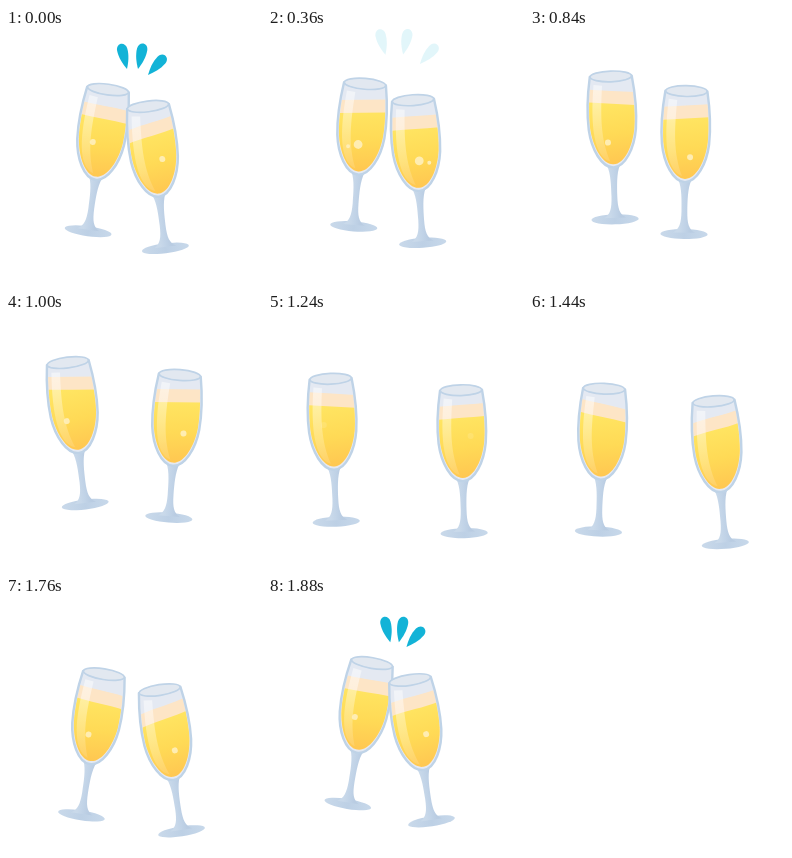
Animation, 256 px wide and 256 px high, one loop 1.92 s. Source, as an HTML page with a canvas:

```html
<!DOCTYPE html>
<html lang="en">
<head>
<meta charset="utf-8">
<title>Cheers</title>
<style>
html, body { margin: 0; width: 100%; height: 100%; overflow: hidden; background: #fff; }
canvas { display: block; width: 100vw; height: 100vh; }
</style>
</head>
<body>
<canvas id="stage"></canvas>
<script>
const LOOP = 1920, STEP = 40, SIZE = 256;
const canvas = document.getElementById('stage');
const ctx = canvas.getContext('2d');
const dpr = window.devicePixelRatio || 1;
canvas.width = canvas.height = SIZE * dpr;

// Shared swing, mirrored for the second glass:
// time, centre x, half gap, rim y, glass angle, liquid tilt
const SWING = [
  [0, 122, 20, 70, 7.5, 16],
  [360, 121, 24, 64, 4.2, 2],
  [680, 121.2, 24.2, 63, 4.3, 5.5],
  [880, 118, 42, 54.5, -2.8, 2.5],
  [1000, 117.8, 56, 56.8, -5.7, -0.5],
  [1240, 127.8, 65.2, 72.5, -0.5, 4],
  [1600, 128.2, 42.8, 90, 6.6, 24],
  [1700, 127, 33, 90, 8.4, 21],
  [1880, 123, 19, 75.5, 9.2, 14]
];
// Birth time, first x, last x, radius
const BUBBLES = [[60, 1, 2.4, 4.4], [110, 12, 12, 2], [640, 0.5, 8.6, 3], [1480, 0, 7.8, 3]];
// Tip x, tip y, direction
const DROPS = [[121, 41, -14], [132, 41, 12], [142, 47, 42]];

const rad = deg => deg * Math.PI / 180;
const clamp = v => Math.max(0, Math.min(1, v));
const since = (t, t0) => (t - t0 + LOOP) % LOOP;

// Smooth periodic curve through the key rows
function swing(t) {
  const n = SWING.length;
  const at = i => ({ t: SWING[(i + n) % n][0] + LOOP * Math.floor(i / n), v: SWING[(i + n) % n] });
  let i = n - 1;
  while (SWING[i][0] > t) i--;
  const a = at(i - 1), b = at(i), c = at(i + 1), d = at(i + 2);
  const h = c.t - b.t, u = (t - b.t) / h, u2 = u * u, u3 = u2 * u;
  return b.v.slice(1).map((start, j) => {
    const k = j + 1;
    const m0 = (c.v[k] - a.v[k]) / (c.t - a.t) * h;
    const m1 = (d.v[k] - start) / (d.t - b.t) * h;
    return (2 * u3 - 3 * u2 + 1) * start + (u3 - 2 * u2 + u) * m0 +
      (3 * u2 - 2 * u3) * c.v[k] + (u3 - u2) * m1;
  });
}

function gradient(x0, y0, x1, y1, ...colors) {
  const g = ctx.createLinearGradient(x0, y0, x1, y1);
  colors.forEach((c, i) => g.addColorStop(i / (colors.length - 1), c));
  return g;
}

function ellipse(x, y, rx, ry = rx) {
  ctx.beginPath();
  ctx.ellipse(x, y, rx, ry, 0, 0, Math.PI * 2);
}

const bowl = new Path2D(
  'M-21 0C-23.6 16-25 38-23.6 53C-21.5 72-12 91 0 91' +
  'C12 91 21.5 72 23.6 53C25 38 23.6 16 21 0Z');
const inside = new Path2D();
inside.addPath(bowl, new DOMMatrix([0.94, 0, 0, 0.965, 0, 0]));
const stem = new Path2D(
  'M-6.5 89C-2.8 97-3 110-2.9 120C-3 132-4.5 138-11 141.5' +
  'L11 141.5C4.5 138 3 132 2.9 120C3 110 2.8 97 6.5 89Z');
const shine = new Path2D('M-17.5 8L-9 9C-11.5 40-12 62-3 85C-19 80-22 50-17.5 8Z');
const drop = new Path2D('M0 0C-3-6-5.5-13-5.2-20C-4.8-28 4.8-28 5.2-20C5.5-13 3-6 0 0Z');

function fillBelow(level, slope, bend, color) {
  const w = 27;
  ctx.beginPath();
  ctx.moveTo(-w, level - slope * w);
  ctx.bezierCurveTo(-9, level - slope * 9 + bend, 9, level + slope * 9 - bend, w, level + slope * w);
  ctx.lineTo(w, 95);
  ctx.lineTo(-w, 95);
  ctx.fillStyle = color;
  ctx.fill();
}

function drawBubbles(t, side) {
  ctx.fillStyle = '#fff0bd';
  for (const [born, x0, x1, r] of BUBBLES) {
    const age = since(t, born);
    ctx.globalAlpha = 0.9 * clamp(age / 40) * clamp((640 - age) / 180);
    ellipse(side * (x0 + (x1 - x0) * clamp(age / 380)), 76 - 0.05 * age, r);
    ctx.fill();
  }
  ctx.globalAlpha = 1;
}

function drawGlass(t, side) {
  const [cx, gap, y, open, tilt] = swing(t);
  const near = (1 + Math.cos(2 * Math.PI * t / LOOP)) / 2;
  const angle = (30 - gap) * 0.05 - side * open;
  const surface = -3.5 * near - side * tilt;
  const slope = Math.tan(rad(surface - angle));
  const bend = 5 * Math.tan(rad(surface));
  const level = 27.3 + 2.4 * near;

  ctx.save();
  ctx.translate(cx + side * gap, y + side * (9.6 - 0.06 * gap));
  ctx.rotate(rad(angle));

  ellipse(0, 143, 23.6, 5);
  ctx.fillStyle = gradient(-23, 0, 23, 0, '#c9d9ea', '#bdd0e5', '#c7d8ea');
  ctx.fill();
  ctx.fillStyle = gradient(-5, 0, 6, 0, '#c9d9ea', '#c1d3e7', '#b9cce2');
  ctx.fill(stem);

  ctx.fillStyle = '#e4e9f2';
  ctx.fill(bowl);
  ctx.save();
  ctx.clip(inside);
  fillBelow(level - 13, slope, bend, '#fde5c6');
  fillBelow(level, slope, bend, gradient(-4, 26, 4, 89, '#ffe562', '#ffda56', '#ffc651'));
  ctx.fillStyle = gradient(0, 8, 0, 85, 'rgba(255,255,255,.5)', 'rgba(255,255,255,.3)', 'rgba(255,255,255,.12)');
  ctx.fill(shine);
  drawBubbles(t, side);
  ctx.restore();

  ctx.lineWidth = 2.4;
  ctx.lineJoin = 'round';
  ctx.strokeStyle = '#bfd3e7';
  ctx.stroke(bowl);
  ellipse(0, 0, 20.7, 5.4);
  ctx.fillStyle = '#e2e8f0';
  ctx.fill();
  ctx.lineWidth = 1.7;
  ctx.stroke();
  ctx.restore();
}

function drawDrops(t) {
  const age = since(t, 1840);
  const travel = 16 - 16 * Math.exp((80 - age) / 139);
  const size = Math.min(1, 0.5 + age / 80);
  ctx.fillStyle = '#12b3d7';
  ctx.globalAlpha = clamp((480 - age) / 330);
  for (const [x, y, turn] of DROPS) {
    ctx.save();
    ctx.translate(x, y);
    ctx.rotate(rad(turn));
    ctx.translate(0, -travel);
    ctx.scale(size, size);
    ctx.fill(drop);
    ctx.restore();
  }
  ctx.globalAlpha = 1;
}

function draw(now) {
  const t = Math.floor((now % LOOP) / STEP) * STEP;
  ctx.setTransform(dpr, 0, 0, dpr, 0, 0);
  ctx.fillStyle = '#fff';
  ctx.fillRect(0, 0, SIZE, SIZE);
  drawGlass(t, -1);
  drawGlass(t, 1);
  drawDrops(t);
}

let start = null;
function tick(now) {
  if (start === null) start = now;
  draw(Math.max(0, now - start));
  requestAnimationFrame(tick);
}
draw(0);
requestAnimationFrame(tick);
</script>
</body>
</html>
```
